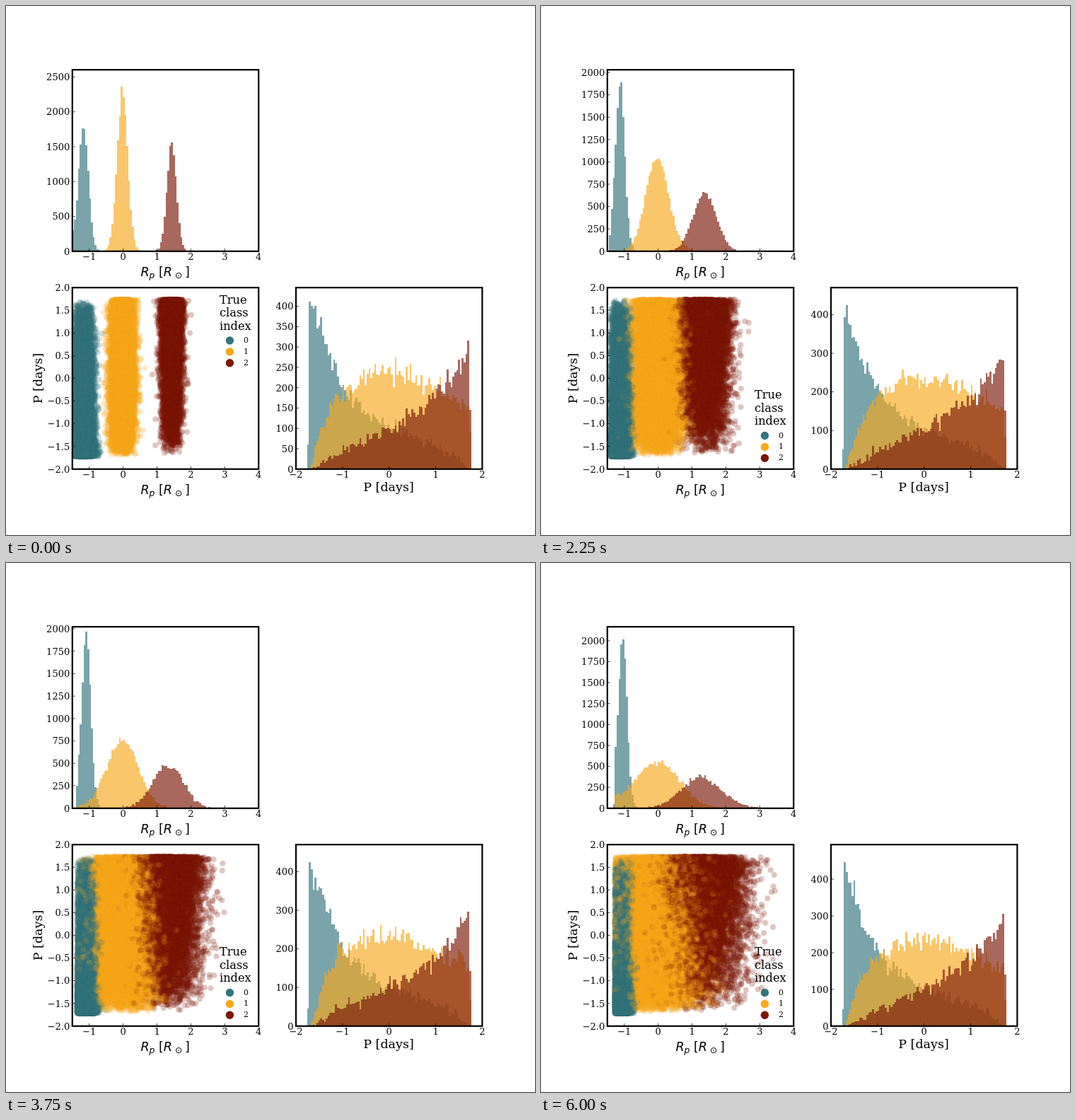
Write an HTML page with a canvas that moves like this. It is 748 px wide and 748 px high and loops after 6.75 s.

```html
<!DOCTYPE html>
<html>
<head>
<meta charset="utf-8">
<style>
  html, body { margin: 0; width: 100%; height: 100%; overflow: hidden; background: #fff; }
  canvas { display: block; }
</style>
</head>
<body>
<canvas id="stage" width="748" height="748"></canvas>
<script>
const SIZE = 748, STEP_MS = 750, STEPS = 9, BINS = 100, P_MIN = -1.74, P_MAX = 1.74;
const SERIF = '"DejaVu Serif", serif', SANS = '"DejaVu Sans", sans-serif';

// Upper limits of the two count axes, one per step.
const radiusTop = [2603, 1906, 1945, 2030, 2021, 2022, 2120, 2144, 2166];
const periodTop = [446, 465, 477, 470, 472, 470, 474, 474, 494];

// Per class: colour, period profile (period, count per bin), radius mean and spread at step k.
const classes = [
  { color: '#34747d',
    profile: [[-1.725, 420], [-1.5, 350], [-1.3, 280], [-1.1, 228], [-.9, 187], [-.5, 137],
              [0, 105], [.5, 80], [1, 60], [1.4, 35], [1.73, 0]],
    mean: k => -1.17 + .016 * k, spread: k => .143 - .002 * k },
  { color: '#f8a81c',
    profile: [[-1.7, 0], [-1.4, 115], [-1.1, 180], [-.8, 207], [-.4, 228], [0, 236], [.5, 226],
              [1, 200], [1.4, 170], [1.74, 150]],
    mean: () => -.02, spread: k => .157 + .061 * k },
  { color: '#7a1709',
    profile: [[-1.68, 0], [-1, 45], [-.5, 75], [0, 100], [.5, 135], [1, 185], [1.4, 230], [1.74, 300]],
    mean: k => 1.43 - .02 * k, spread: k => .141 + .073 * k - .002 * k * k }
];

const W = 263.4, H = 256.6;
const panel = (x, y, x0, x1, y0, y1) => ({
  x, y, x0, x1,
  px: v => x + (v - x0) / (x1 - x0) * W,
  py: v => y + H - (v - y0) / (y1 - y0) * H
});

function randomFrom(seed) {
  return () => {
    seed = seed + 0x6D2B79F5 | 0;
    let t = Math.imul(seed ^ seed >>> 15, 1 | seed);
    t = t + Math.imul(t ^ t >>> 7, 61 | t) ^ t;
    return ((t ^ t >>> 14) >>> 0) / 4294967296;
  };
}

function density(profile, p) {
  const i = profile.findIndex(point => point[0] > p);
  if (i < 1) return 0;
  const [a, u] = profile[i - 1], [b, v] = profile[i];
  return u + (v - u) * (p - a) / (b - a);
}

// Classes come out interleaved, so that their dots mix in drawing order.
function samplePoints(k) {
  const rand = randomFrom(101 + k * 977), points = [], peak = 420;
  const floor = -1.5 + .027 * k;
  const trials = (P_MAX - P_MIN) * peak / (4 / BINS);
  for (let n = 0; n < trials; n++) {
    const p = P_MIN + rand() * (P_MAX - P_MIN);
    classes.forEach((c, group) => {
      if (rand() * peak > density(c.profile, p)) return;
      const normal = Math.sqrt(-2 * Math.log(1 - rand())) * Math.cos(2 * Math.PI * rand());
      const r = c.mean(k) + c.spread(k) * normal;
      points.push({ group, p, r: floor + Math.abs(r - floor) });
    });
  }
  return points;
}

function newCanvas(size) {
  const canvas = document.createElement('canvas');
  canvas.width = canvas.height = size;
  return [canvas, canvas.getContext('2d')];
}

function disc(g, x, y, radius, color) {
  g.fillStyle = color;
  g.beginPath();
  g.arc(x, y, radius, 0, 2 * Math.PI);
  g.fill();
}

const dots = classes.map(c => {
  const [canvas, g] = newCanvas(10);
  g.globalAlpha = .25;
  disc(g, 5, 5, 4, c.color);
  return canvas;
});

function text(g, s, x, y, size, align = 'left', font = SERIF, style = '') {
  g.fillStyle = '#000';
  g.font = `${style} ${size}px ${font}`;
  g.textAlign = align;
  g.fillText(s, x, y);
}

function clipped(g, box, draw) {
  g.save();
  g.beginPath();
  g.rect(box.x, box.y, W, H);
  g.clip();
  draw();
  g.restore();
}

function histogram(g, box, points, key) {
  const counts = classes.map(() => new Array(BINS).fill(0));
  for (const point of points) {
    const bin = Math.floor((point[key] - box.x0) / (box.x1 - box.x0) * BINS);
    if (bin >= 0 && bin < BINS) counts[point.group][bin]++;
  }
  const edge = i => Math.round(box.x + i * W / BINS), base = Math.round(box.py(0));
  clipped(g, box, () => {
    g.globalAlpha = .65;
    counts.forEach((bars, group) => {
      g.fillStyle = classes[group].color;
      g.beginPath();
      bars.forEach((n, i) => {
        const top = Math.round(box.py(n));
        g.rect(edge(i), top, edge(i + 1) - edge(i), base - top);
      });
      g.fill();
    });
  });
}

function scatter(g, box, points) {
  clipped(g, box, () => {
    for (const { group, r, p } of points) g.drawImage(dots[group], box.px(r) - 5, box.py(p) - 5);
  });
}

const range = (from, to, step) =>
  Array.from({ length: Math.floor((to - from) / step + 1e-6) + 1 }, (_, i) => from + i * step);
const label = (v, digits) => v.toFixed(digits).replace('-', '\u2212');

function axes(g, box, xTicks, yTicks, digits = 0) {
  const bottom = box.y + H;
  g.strokeStyle = '#000';
  g.lineWidth = .7;
  g.beginPath();
  for (const v of xTicks) {
    const x = box.px(v);
    g.moveTo(x, bottom);
    g.lineTo(x, bottom - 4);
    text(g, label(v, 0), x, bottom + 12.4, 13, 'center');
  }
  for (const v of yTicks) {
    const y = box.py(v);
    g.moveTo(box.x, y);
    g.lineTo(box.x + 4, y);
    text(g, label(v, digits), box.x - 3.6, y + 4.8, 13, 'right');
  }
  g.stroke();
  g.lineWidth = 2.2;
  g.strokeRect(box.x, box.y, W, H);
}

function radiusLabel(g, y) {
  text(g, 'R', 190.5, y, 17.5, 'left', SANS, 'italic');
  text(g, 'p', 202.5, y + 3, 12.3, 'left', SANS, 'italic');
  text(g, '[', 216, y, 17.5, 'left', SANS);
  text(g, 'R', 222.7, y, 17.5, 'left', SANS, 'italic');
  text(g, '\u2299', 239, y + 3, 12.3, 'left', SANS);
  text(g, ']', 253, y, 17.5, 'left', SANS);
}

function legend(g, y) {
  ['True', 'class', 'index'].forEach((word, i) => text(g, word, 302, y + 18.6 * i, 16.2));
  classes.forEach((c, i) => {
    disc(g, 316.4, y + 52.5 + 15.9 * i, 5.7, c.color);
    text(g, String(i), 336, y + 55.5 + 15.9 * i, 11);
  });
}

function render(k) {
  const [canvas, g] = newCanvas(SIZE);
  g.fillStyle = '#fff';
  g.fillRect(0, 0, SIZE, SIZE);
  const points = samplePoints(k);
  const radius = panel(93.8, 90.2, -1.5, 4, 0, radiusTop[k]);
  const cloud = panel(93.8, 398.2, -1.5, 4, -2, 2);
  const period = panel(410, 398.2, -2, 2, 0, periodTop[k]);

  histogram(g, radius, points, 'r');
  scatter(g, cloud, points);
  histogram(g, period, points, 'p');

  axes(g, radius, range(-1, 4, 1), range(0, radiusTop[k], radiusTop[k] > 2500 ? 500 : 250));
  axes(g, cloud, range(-1, 4, 1), range(-2, 2, .5), 1);
  axes(g, period, range(-2, 2, 1), range(0, periodTop[k], periodTop[k] < 450 ? 50 : 100));

  radiusLabel(g, 381.5);
  radiusLabel(g, 689.5);
  text(g, 'P [days]', 541, 686, 17.5, 'center');
  g.save();
  g.translate(50.5, 526.5);
  g.rotate(-Math.PI / 2);
  text(g, 'P [days]', 0, 0, 17.5, 'center');
  g.restore();
  legend(g, k < 3 ? 420.5 : 555);
  return canvas;
}

const pictures = [];
const picture = k => pictures[k] ??= render(k);
const stage = document.getElementById('stage').getContext('2d');
let shown = -1;

function tick() {
  const k = Math.floor(performance.now() / STEP_MS) % STEPS;
  if (k !== shown) {
    stage.drawImage(picture(k), 0, 0);
    shown = k;
  } else {
    picture((k + 1) % STEPS); // prepared ahead of its turn
  }
  requestAnimationFrame(tick);
}
tick();
</script>
</body>
</html>
```
